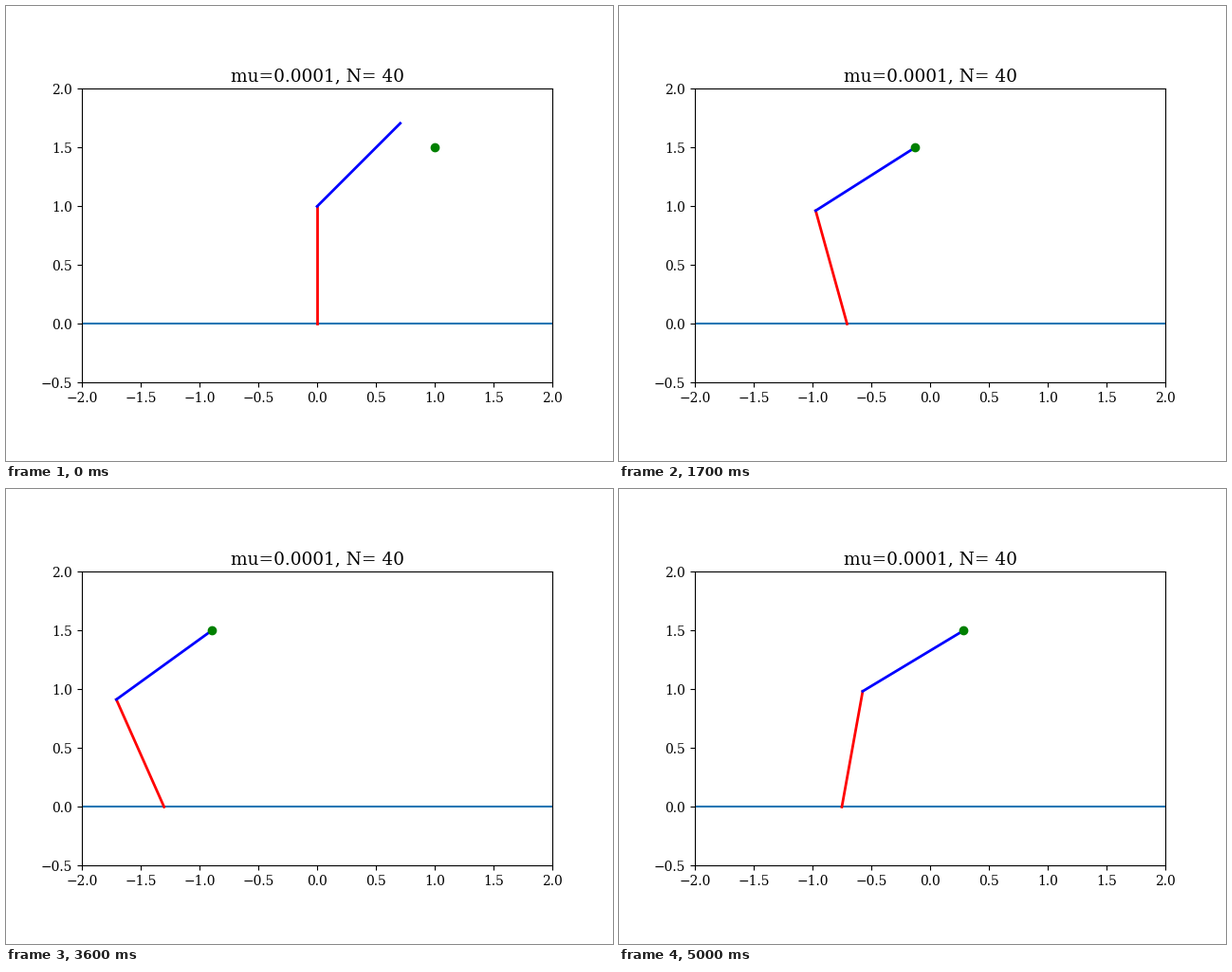
Write a matplotlib script that moves like this. It is 640 px wide and 480 px high and loops after 5.05 s.

```python
import numpy as np
import matplotlib.pyplot as plt
from matplotlib.animation import FuncAnimation

plt.rcParams["font.family"] = "DejaVu Serif"

FRAMES, STEP = 101, 50
START = np.array([np.sqrt(0.5), 1 + np.sqrt(0.5)])


def goal_at(t):
    return np.array([np.cos(t), 1.5])


def settle(t):
    """Falls from 1 to 0 with a single overshoot, starting at rest."""
    return (1 + 10 * t - 122 * t * t) * np.exp(-10 * t)


def shoulder(t):
    """Lower link angle: a slow swing plus the initial catch-up."""
    swing = 102.26 - 2.37 * t - 24.44 * np.cos(t) + 3.85 * np.sin(t)
    return np.radians(swing + 7.7 * settle(t) + 4.48 * np.exp(-1.6 * t))


def along(angle):
    return np.array([np.cos(angle), np.sin(angle)])


def pose(t):
    """Base, elbow and tip of the two unit links, base on the rail."""
    tip = goal_at(t) + (START - goal_at(0)) * settle(t)
    a = shoulder(t)
    b = np.arcsin(tip[1] - np.sin(a))
    elbow = tip - along(b)
    return elbow - along(a), elbow, tip


fig, ax = plt.subplots(figsize=(6.4, 4.8), dpi=100)
ax.set_aspect("equal")
ax.set_xlim(-2, 2)
ax.set_ylim(-0.5, 2)
ax.set_title("mu=0.0001, N= 40", fontsize=13.3)
ax.axhline(0)
lower, = ax.plot([], [], "r", lw=2)
upper, = ax.plot([], [], "b", lw=2)
dot, = ax.plot([], [], "go")


def draw(n):
    t = n * STEP / 1000
    base, elbow, tip = pose(t)
    lower.set_data(*zip(base, elbow))
    upper.set_data(*zip(elbow, tip))
    dot.set_data(*goal_at(t)[:, None])
    return lower, upper, dot


anim = FuncAnimation(fig, draw, frames=FRAMES, interval=STEP, repeat=True,
                     repeat_delay=0)
plt.show()
```
